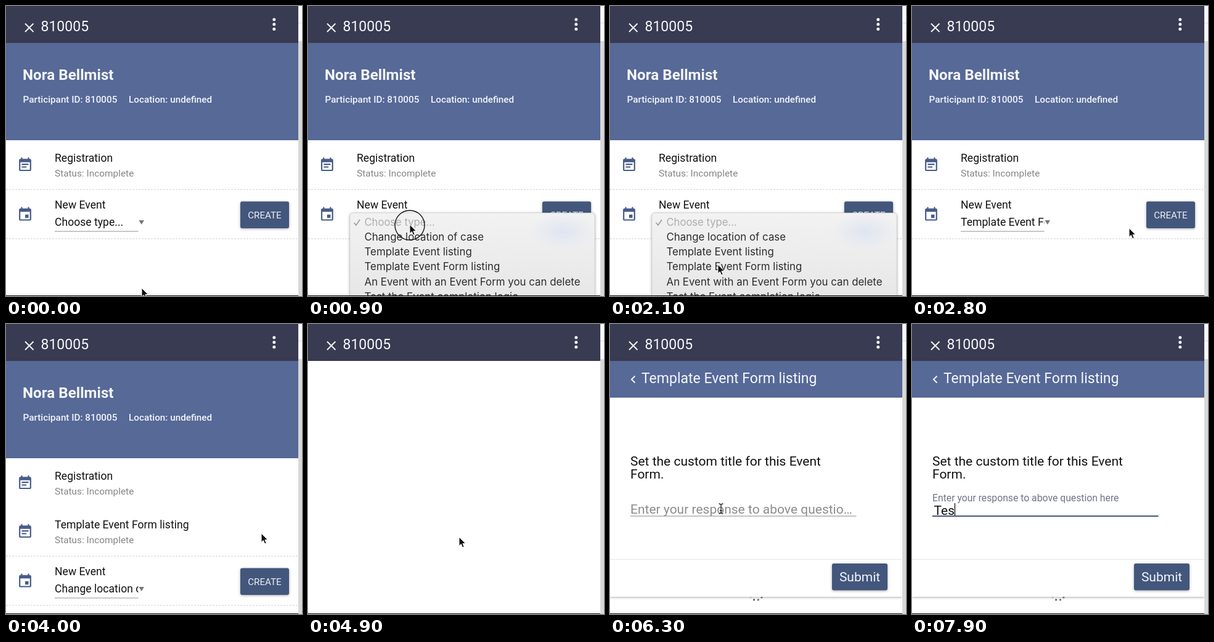
Recreate the animation shown at these times as an HTML page. Size 480x471 px, loop 8000 ms.

```html
<!DOCTYPE html>
<html lang="en">
<head>
<meta charset="utf-8">
<title>Case event demo</title>
<style>
html, body { margin: 0; width: 100%; height: 100%; overflow: hidden; background: #fff; }
svg { display: block; }
text { font: 17.6px Roboto, sans-serif; fill: #111; white-space: pre; }
.bar { font-size: 23px; fill: #f6f7fb; }
.name { font-size: 24.2px; font-weight: 600; fill: #f4f5fa; }
.info { font-size: 15.25px; font-weight: 500; fill: #f2f4fa; }
.status { font-size: 15.4px; fill: #858585; }
.button { font-size: 15.2px; fill: #eef0f6; }
.heading { font-size: 22px; font-weight: 500; }
.form { font-size: 21px; }
.menu text { font: 16.87px Inter, sans-serif; fill: #2c2c2e; }
.menu .off { font-size: 16.6px; fill: #adadaf; }
.icon { fill: #485c8a; }
.dash { stroke: #cfcfcf; stroke-dasharray: 3 2; }
.shadow { filter: drop-shadow(0 1px 2px #0005); }
</style>
</head>
<body>
<svg width="480" height="471" viewBox="0 0 480 471">
  <defs>
    <path id="note" transform="scale(1.1)" d="M17 10H7v2h10v-2zm2-7h-1V1h-2v2H8V1H6v2H5c-1.11 0-1.99.9-1.99 2L3 19c0 1.1.89 2 2 2h14c1.1 0 2-.9 2-2V5c0-1.1-.9-2-2-2zm0 16H5V8h14v11zm-5-5H7v2h7v-2z"/>
    <path id="event" transform="scale(1.1)" d="M17 12h-5v5h5v-5zM16 1v2H8V1H6v2H5c-1.11 0-1.99.9-1.99 2L3 19c0 1.1.89 2 2 2h14c1.1 0 2-.9 2-2V5c0-1.1-.9-2-2-2h-1V1h-2zm3 18H5V8h14v11z"/>
    <path id="clipboard" transform="scale(1.1)" d="M19 3h-4.18C14.4 1.84 13.3 1 12 1c-1.3 0-2.4.84-2.82 2H5c-1.1 0-2 .9-2 2v14c0 1.1.9 2 2 2h14c1.1 0 2-.9 2-2V5c0-1.1-.9-2-2-2zm-7 0c.55 0 1 .45 1 1s-.45 1-1 1-1-.45-1-1 .45-1 1-1zm2 14H7v-2h7v2zm3-4H7v-2h10v2zm0-4H7V7h10v2z"/>
    <linearGradient id="sheet" x2="0" y2="1"><stop stop-color="#f2f2f3"/><stop offset="1" stop-color="#e6e6e7"/></linearGradient>
    <radialGradient id="tint"><stop stop-color="#dfe5f1"/><stop offset="1" stop-color="#dfe5f1" stop-opacity="0"/></radialGradient>
  </defs>
  <rect width="480" height="471" fill="#fff"/>

  <g id="casePage">
    <rect y="60" width="474" height="158" fill="#566997"/>
    <text class="name" x="27" y="120">Nora Bellmist</text>
    <text class="info" x="27.5" y="157">Participant ID: 810005</text>
    <text class="info" x="199" y="157">Location: undefined</text>
    <use class="icon" href="#note" x="17.8" y="245"/>
    <text x="79" y="253">Registration</text>
    <text class="status" x="79" y="276.5">Status: Incomplete</text>
    <g id="addedRow">
      <use class="icon" href="#note" x="17.8" y="324"/>
      <text x="79" y="332">Template Event Form listing</text>
      <text class="status" x="79" y="355.5">Status: Incomplete</text>
    </g>
    <g id="newRow">
      <path class="dash" d="M0 298H474M0 378H474"/>
      <use class="icon" href="#event" x="17.8" y="325.5"/>
      <text x="79" y="328.5">New Event</text>
      <svg x="79" y="335" width="135.5" height="32"><text id="choice" y="22"></text></svg>
      <path d="M79 366H214.5" stroke="#909090"/>
      <path d="M215.5 348H224L219.7 355Z" fill="#777"/>
      <rect class="shadow" x="380" y="317.5" width="79" height="43.5" rx="3" fill="#43567c"/>
      <text class="button" x="419.5" y="345" text-anchor="middle">CREATE</text>
    </g>
  </g>

  <g id="subBar">
    <rect y="60" width="474" height="59.5" fill="#566997"/>
    <path d="M40.5 84.5 35 90 40.5 95.5" fill="none" stroke="#f4f5fa" stroke-width="2"/>
    <text class="bar" x="51" y="96">Template Event Form listing</text>
  </g>

  <g id="eventPage">
    <text class="heading" x="22" y="178">Forms for Nora Bellmist, Role 1 Participant,</text>
    <text class="heading" x="22" y="213">810005</text>
    <rect y="250" width="4.5" height="79" fill="#ef3b22"/>
    <use class="icon" href="#clipboard" x="21.8" y="276.5"/>
    <text x="83.5" y="284.5">Template Event Form list…</text>
    <text class="status" x="83.5" y="308.5">Status: Incomplete</text>
  </g>

  <g id="spinner"></g>

  <g id="formPage">
    <rect class="shadow" y="120" width="474" height="323" fill="#fff"/>
    <text class="form" x="33" y="229.5">Set the custom title for this Event</text>
    <text class="form" x="33" y="250.5">Form.</text>
    <text class="form" id="label"></text>
    <path id="underline" d="M33 312H399.5"/>
    <text class="form" id="answer" x="35.5" y="310"></text>
    <path id="caret" stroke="#111" stroke-width="1.3"/>
    <path d="M0 382.5H474" stroke="#e6e6e6"/>
    <rect class="shadow" x="360" y="389" width="90" height="43.5" rx="3" fill="#43567c"/>
    <text class="form" x="405" y="418" text-anchor="middle" style="fill:#f4f5fa">Submit</text>
  </g>

  <rect width="474" height="60" fill="#383b51"/>
  <path d="M31 28.5 44.5 42M44.5 28.5 31 42" stroke="#f4f5fa" stroke-width="2"/>
  <text class="bar" x="56.5" y="41">810005</text>
  <g fill="#f4f5fa"><circle cx="434.8" cy="22" r="2.5"/><circle cx="434.8" cy="29.7" r="2.5"/><circle cx="434.8" cy="37.4" r="2.5"/></g>

  <rect x="474" width="6" height="57" fill="#fafafa"/>
  <path d="M474 27.5H480" stroke="#ddd"/>
  <rect x="474" y="57" width="6" height="414" fill="#d8d8d8"/>

  <g class="menu" id="menu">
    <rect class="shadow" x="68" y="336" width="397" height="150" rx="5" fill="url(#sheet)" stroke="#c9c9cc" stroke-width=".6"/>
    <rect x="360" y="336" width="105" height="60" fill="url(#tint)"/>
    <path d="M74.5 352 78 356 84 347" fill="none" stroke="#999" stroke-width="1.6"/>
  </g>
  <path d="M0 470.5H474" stroke="#111"/>

  <circle id="ring" cy="1" r="24" fill="none" stroke="#111" stroke-width="1.4"/>
  <path id="arrow" d="M0 0V14.5L3.3 11.5 5.6 17 8.2 15.9 5.9 10.6H10.5Z" fill="#111" stroke="#fff"/>
  <path id="beam" d="M-3.5-8Q0-8 0-5V5Q0 8-3.5 8M3.5-8Q0-8 0-5V5Q0 8 3.5 8M-2 3H2" fill="none" stroke="#222" stroke-width="1.3"/>
</svg>

<script>
const DURATION = 8000, STEP = 100;
const MENU_OPEN = 900, MENU_CLOSED = 2400, CREATED = 3400;
const LEAVE_CASE = 4800, EVENT_READY = 5000, LEAVE_EVENT = 6000, FORM_READY = 6200;
const FOCUS = 6500, KEYS = [7500, 7700, 7800];
const CLICKS = [800, 2200, 3100, 4500, 5800];
const DOTS = 10, SPIN = 800;

// Pointer stops: time, x, y
const STOPS = [
  [0, 220, 458], [700, 165, 355], [1300, 165, 355], [2000, 175, 420], [2400, 175, 420],
  [3000, 414, 340], [4000, 414, 340], [4500, 245, 346], [5400, 245, 346],
  [5800, 205, 290], [6000, 205, 290], [6300, 180, 300]
];

const $ = id => document.getElementById(id);
const make = (parent, tag, attrs) => {
  const el = document.createElementNS("http://www.w3.org/2000/svg", tag);
  set(el, attrs);
  return parent.appendChild(el);
};
const set = (el, attrs) => {
  for (const key in attrs) el.setAttribute(key, attrs[key]);
};
const show = (id, on) => $(id).style.display = on ? "" : "none";
const ease = k => k * k * (3 - 2 * k);
const progress = (t, from, to) => ease(Math.min(1, Math.max(0, (t - from) / (to - from))));
const mix = (a, b, k) => a + (b - a) * k;

["Choose type...", "Change location of case", "Template Event listing", "Template Event Form listing",
 "An Event with an Event Form you can delete", "Test the Event completion logic"].forEach((label, i) => {
  make($("menu"), "text", { x: 91.5, y: 357 + 24.15 * i, class: i ? "" : "off" }).textContent = label;
});

const dots = Array.from({ length: DOTS }, (_, i) => {
  const angle = i / DOTS * 2 * Math.PI;
  return make($("spinner"), "circle", {
    cx: 237 + 11 * Math.cos(angle), cy: 437.5 + 11 * Math.sin(angle), r: 1.6, fill: "#555"
  });
});

function pointerAt(t) {
  let i = 0;
  while (i < STOPS.length - 2 && t >= STOPS[i + 1][0]) i++;
  const [t0, x0, y0] = STOPS[i], [t1, x1, y1] = STOPS[i + 1];
  const k = progress(t, t0, t1);
  return [mix(x0, x1, k), mix(y0, y1, k)];
}

function drawPointer(t) {
  const [x, y] = pointerAt(t);
  for (const id of ["ring", "arrow", "beam"]) set($(id), { transform: `translate(${x} ${y})` });
  show("arrow", t < FORM_READY);
  show("beam", t >= FORM_READY && t < KEYS[0]);
  const click = CLICKS.find(c => t >= c && t < c + 400);
  show("ring", click !== undefined);
  if (click !== undefined) set($("ring"), { opacity: Math.min(1, 1.4 - (t - click) / 300) });
}

function drawForm(t) {
  const focused = t >= FOCUS, k = progress(t, FOCUS, FOCUS + 400);
  $("label").textContent = focused
    ? "Enter your response to above question here" : "Enter your response to above questio…";
  set($("label"), { transform: `translate(33 ${mix(307.5, 288, k)}) scale(${mix(1, 0.75, k)})` });
  $("label").style.fill = focused ? "#6d7688" : "#8c8c8c";
  set($("underline"), { stroke: focused ? "#43567c" : "#8a8a8a", "stroke-width": focused ? 2 : 1 });

  const typed = KEYS.filter(key => t >= key).length;
  $("answer").textContent = "Tes".slice(0, typed);
  const x = typed ? 36 + $("answer").getComputedTextLength() : 34.5;
  set($("caret"), { d: `M${x} 291V311` });
  show("caret", focused && (typed || (t - FOCUS) % 1000 < 500));

  dots.forEach((dot, i) => {
    const lag = (((t - FORM_READY) / SPIN + 0.25 - i / DOTS) % 1 + 1) % 1;
    set(dot, { opacity: 1 - 0.8 * lag });
  });
}

function draw(now) {
  const t = Math.floor(now % DURATION / STEP) * STEP;
  show("casePage", t < LEAVE_CASE);
  show("addedRow", t >= CREATED);
  set($("newRow"), { transform: `translate(0 ${t >= CREATED ? 79 : 0})` });
  $("choice").textContent = t < MENU_CLOSED ? "Choose type..."
    : t < CREATED ? "Template Event Form listing" : "Change location of case";
  show("menu", t >= MENU_OPEN && t < MENU_CLOSED);
  show("subBar", t >= EVENT_READY);
  show("eventPage", t >= EVENT_READY && t < LEAVE_EVENT);
  show("spinner", t >= LEAVE_EVENT);
  show("formPage", t >= FORM_READY);
  drawForm(t);
  drawPointer(t);
  requestAnimationFrame(draw);
}
requestAnimationFrame(draw);
</script>
</body>
</html>
```
